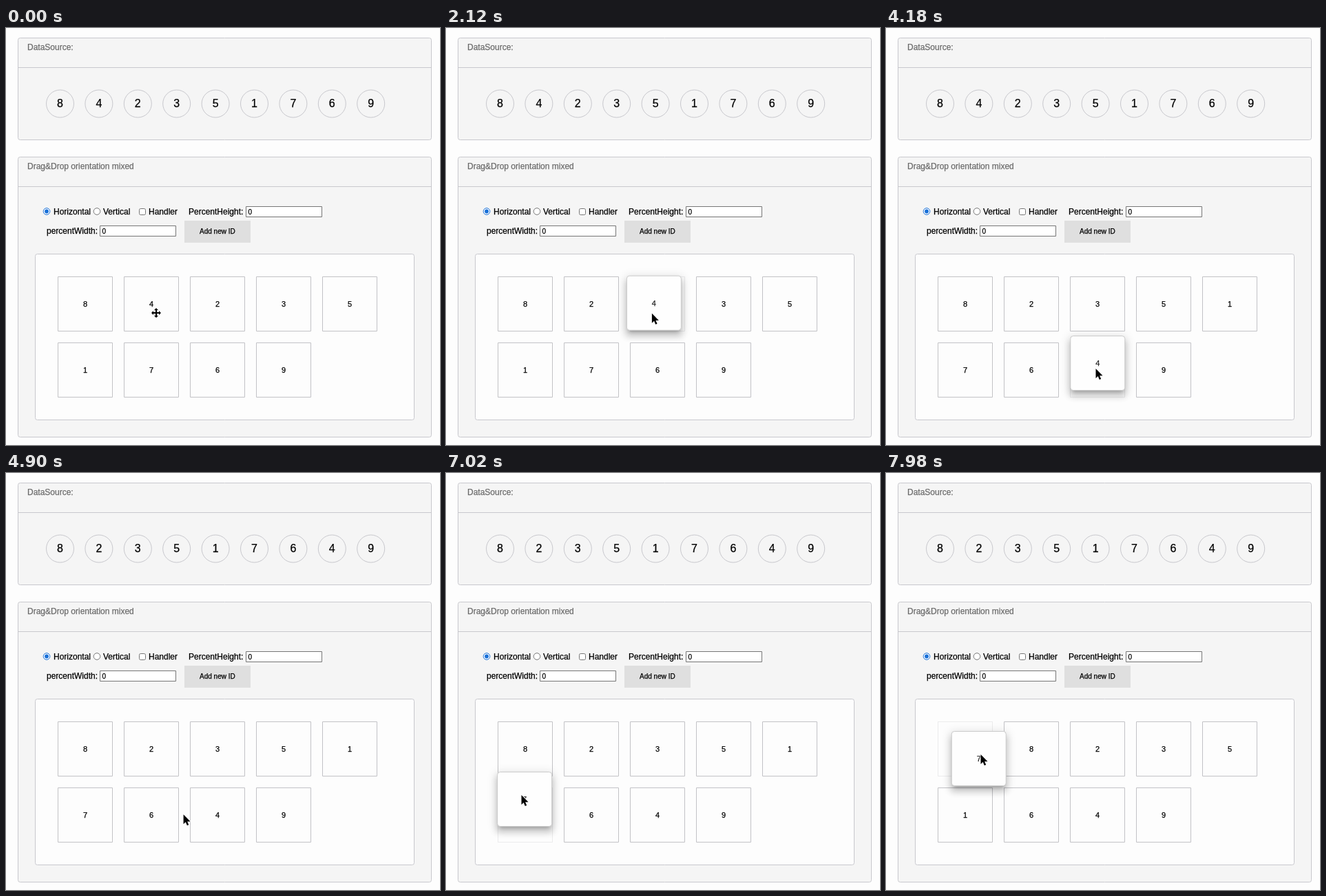
An HTML page with a canvas for the animation above (8000 ms loop, 630 by 606 pixels).

```html
<!DOCTYPE html>
<html lang="en">
<head>
<meta charset="utf-8">
<title>Drag and drop</title>
<style>
html, body { margin: 0; width: 100%; height: 100%; overflow: hidden; background: #fdfdfd; }
canvas { display: block; width: 630px; height: 606px; }
</style>
</head>
<body>
<canvas id="stage" width="630" height="606"></canvas>
<script>
const ctx = document.getElementById('stage').getContext('2d');
const LOOP = 8000, CELL = 80, PITCH = 96;
const FONT = '"Liberation Sans", Arial, sans-serif';
const PAGE = '#fdfdfd', PANEL = '#f5f5f5', LINE = '#c8c8cd', CONTROL = '#767676';

const START_ORDER = '842351769';
const CURSOR_START = { x: 218, y: 414 };

// The cursor position is the sum of these glides
const GLIDES = [
  { at: 900, ms: 400, dx: -9.5, dy: -1 },   // approach tile 4
  { at: 1500, ms: 900, dx: 131, dy: 1 },    // drag right
  { at: 2400, ms: 840, dx: -35, dy: 53 },   // down to the second row
  { at: 3240, ms: 900, dx: 0, dy: 27 },
  { at: 4700, ms: 900, dx: -210, dy: 6 },   // over to tile 7
  { at: 6300, ms: 400, dx: 15, dy: -9 },
  { at: 6760, ms: 720, dx: 0, dy: -66 },    // drag up
  { at: 7480, ms: 500, dx: 28, dy: -17 }
];
const DRAGS = [
  { digit: '4', start: 1300, drop: 4140, end: 4390, gripX: 37, gripY: 54, slip: 0 },
  { digit: '7', start: 6760, drop: LOOP, end: LOOP, gripX: 35, gripY: 33, slip: 8 }
];
const SWAPS = [
  { at: 1880, from: 1, to: 2 },
  { at: 3060, from: 2, to: 7 },
  { at: 7380, from: 5, to: 0 }
];

const progress = (t, start, ms) => Math.min(1, Math.max(0, (t - start) / ms));
const slot = i => ({ x: 75 + i % 5 * PITCH, y: 361 + Math.floor(i / 5) * PITCH });

function cursorAt(t) {
  return GLIDES.reduce((p, g) => {
    const k = progress(t, g.at, g.ms);
    return { x: p.x + g.dx * k, y: p.y + g.dy * k };
  }, CURSOR_START);
}

function orderAt(t) {
  const order = [...START_ORDER];
  for (const { at, from, to } of SWAPS) {
    if (t >= at) order.splice(to, 0, ...order.splice(from, 1));
  }
  return order;
}

// A dropped tile eases out into its slot
function tileAt(drag, t, home) {
  const held = Math.min(t, drag.drop), c = cursorAt(held);
  const slip = drag.slip * progress(held, drag.start, drag.drop - drag.start) ** 2;
  const x = c.x - drag.gripX - slip, y = c.y - drag.gripY;
  const k = t < drag.drop ? 0 : 1 - (1 - progress(t, drag.drop, drag.end - drag.drop)) ** 3;
  return { x: x + (home.x - x) * k, y: y + (home.y - y) * k };
}

function paint(fill, stroke) {
  if (fill) { ctx.fillStyle = fill; ctx.fill(); }
  if (stroke) { ctx.strokeStyle = stroke; ctx.lineWidth = 1; ctx.stroke(); }
}

function box(x, y, w, h, radius, fill, stroke) {
  ctx.beginPath();
  ctx.roundRect(x + .5, y + .5, w - 1, h - 1, radius);
  paint(fill, stroke);
}

function circle(x, y, r, fill, stroke) {
  ctx.beginPath();
  ctx.arc(x, y, r, 0, Math.PI * 2);
  paint(fill, stroke);
}

// A hairline stroke gives the slightly heavier text weight
function text(label, x, y, size, color = '#000', align = 'left') {
  ctx.font = `${size}px ${FONT}`;
  ctx.textAlign = align;
  ctx.fillStyle = ctx.strokeStyle = color;
  ctx.lineWidth = .25;
  ctx.fillText(label, x, y);
  ctx.strokeText(label, x, y);
}

function panel(y, h, title) {
  box(17, y, 601, h, 3, PANEL, LINE);
  ctx.fillStyle = LINE;
  ctx.fillRect(18, y + 43, 599, 1);
  text(title, 31, y + 18, 12, '#6c6c6c');
}

function input(label, labelX, x, y) {
  text(label, labelX, y + 12, 12);
  box(x, y, 111, 16, 0, '#fff', CONTROL);
  text('0', x + 3.5, y + 11.5, 10);
}

function controls() {
  circle(59, 266.5, 4.8, '#fff', '#1870d8');
  circle(59, 266.5, 2.9, '#1870d8');
  text('Horizontal', 69, 271, 12);
  circle(132, 266.5, 4.8, '#fff', CONTROL);
  text('Vertical', 141, 271, 12);
  box(193, 262, 10, 10, 2, '#fff', CONTROL);
  text('Handler', 207, 271, 12);
  input('PercentHeight:', 265, 348, 259);
  input('percentWidth:', 59, 136, 287);
  ctx.fillStyle = '#dfdfdf';
  ctx.fillRect(259, 280, 96, 32);
  text('Add new ID', 281, 299, 10);
}

function cell(digit, i, ghost) {
  const { x, y } = slot(i);
  ctx.globalAlpha = ghost ? .3 : 1;
  box(x, y, CELL, CELL, 0, null, '#c2c2c6');
  text(digit, x + 40, y + 44, 11, '#000', 'center');
  ctx.globalAlpha = 1;
}

// The casting shape lies off stage so that only its shadow shows
function shadow(x, y, dy, blur, spread, alpha) {
  const away = 2000, size = CELL + 2 * spread;
  ctx.save();
  ctx.shadowColor = `rgba(0,0,0,${alpha})`;
  ctx.shadowBlur = blur;
  ctx.shadowOffsetX = away;
  ctx.shadowOffsetY = dy;
  ctx.beginPath();
  ctx.roundRect(x - spread - away, y - spread, size, size, 4);
  paint('#000');
  ctx.restore();
}

function liftedTile(digit, { x, y }) {
  shadow(x, y, 3, 14, 2, .12);
  shadow(x, y, 8, 10, 1, .14);
  shadow(x, y, 5, 5, -3, .2);
  box(x, y, CELL, CELL, 4, '#fefefe', '#cacaca');
  text(digit, x + 40, y + 44, 11, '#222', 'center');
}

const ARROW = new Path2D('M0 0V14L3.2 11L5.3 16L7.7 15L5.6 10.2H10Z');
const MOVE = new Path2D('M0-7L3-4H1V-1H4V-3L7 0L4 3V1H1V4H3L0 7L-3 4H-1V1H-4V3L-7 0L-4-3V-1H-1V-4H-3Z');

function cursor({ x, y }, dragging) {
  const overCell = [...START_ORDER].some((_, i) => {
    const s = slot(i);
    return x >= s.x && x < s.x + CELL && y >= s.y && y < s.y + CELL;
  });
  const shape = overCell && !dragging ? MOVE : ARROW;
  ctx.save();
  ctx.translate(x, y + (shape === ARROW ? 1 : 0));
  ctx.lineWidth = 1.6;
  ctx.strokeStyle = '#fff';
  ctx.stroke(shape);
  ctx.fillStyle = '#000';
  ctx.fill(shape);
  ctx.restore();
}

function draw(t) {
  const drag = DRAGS.find(d => t >= d.start && t < d.end);
  const order = orderAt(t);
  const data = orderAt(t < DRAGS[0].end ? 0 : DRAGS[0].end);

  ctx.fillStyle = PAGE;
  ctx.fillRect(0, 0, 630, 606);
  panel(14, 149, 'DataSource:');
  data.forEach((digit, i) => {
    const x = 78.5 + i * 56.4;
    circle(x, 110, 20, null, LINE);
    text(digit, x, 115, 16, '#000', 'center');
  });

  panel(187, 408, 'Drag&Drop orientation mixed');
  controls();
  box(42, 328, 551, 242, 3, PAGE, LINE);
  order.forEach((digit, i) => cell(digit, i, drag?.digit === digit));
  if (drag) liftedTile(drag.digit, tileAt(drag, t, slot(order.indexOf(drag.digit))));
  cursor(cursorAt(t), drag);
}

function tick() {
  draw(performance.now() % LOOP);
  requestAnimationFrame(tick);
}
tick();
</script>
</body>
</html>
```
